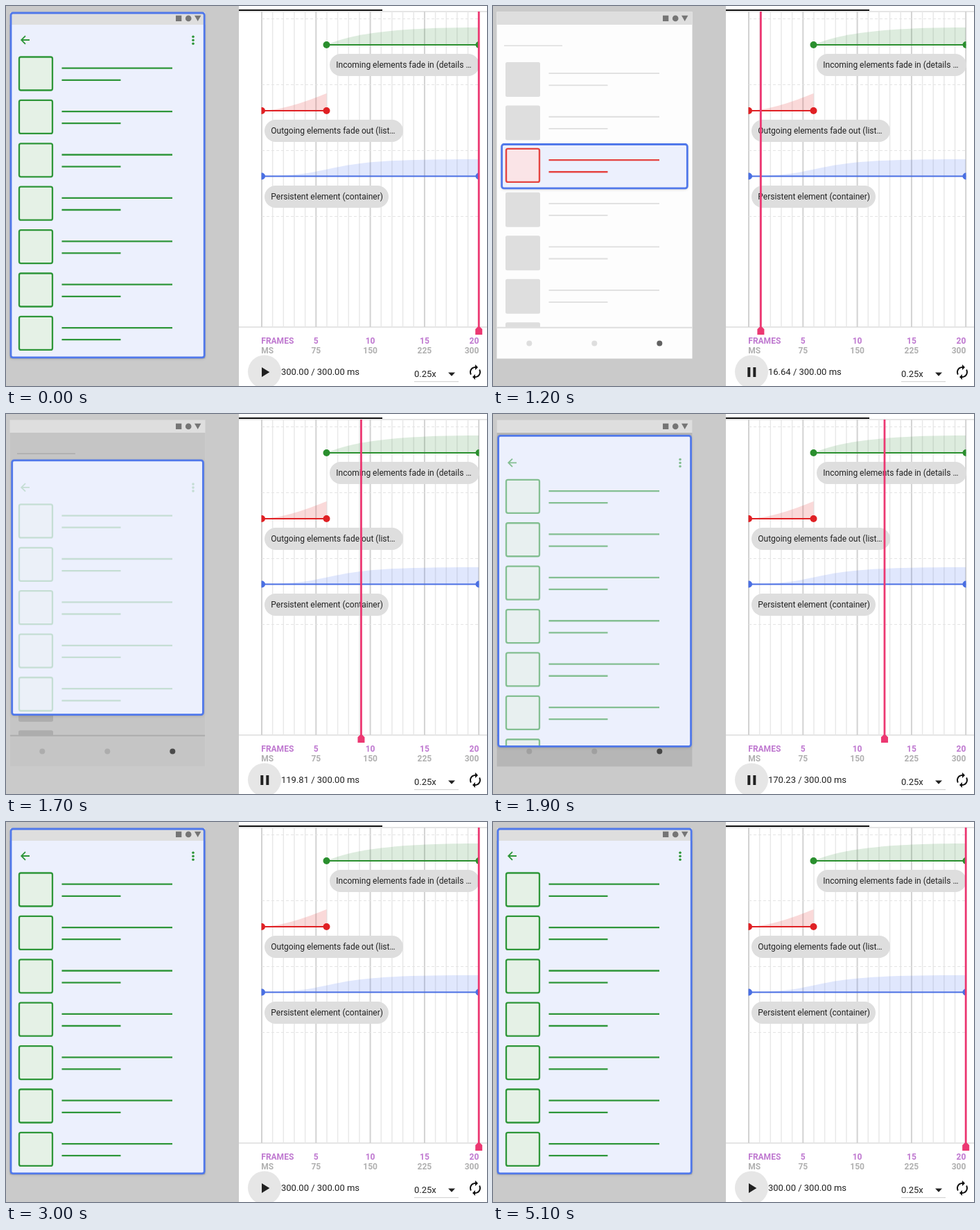
These frames come from a looping animation (694 px wide and 548 px high, 5.2 s). An HTML page:

```html
<!DOCTYPE html>
<html lang="en">
<head>
<meta charset="utf-8">
<title>Container transform timeline</title>
<style>
  html, body { margin: 0; width: 100%; height: 100%; overflow: hidden; background: #fff; }
  svg { display: block; }
  text { font-family: Roboto, sans-serif; fill: #212121; }
  .axis { font-size: 12px; font-weight: 700; }
  .chip { font-size: 12px; }
  .ui { font-size: 13px; }
</style>
</head>
<body>
<svg width="694" height="548" viewBox="0 0 694 548">
  <defs>
    <clipPath id="containerClip"><rect class="frame"/></clipPath>
    <clipPath id="listClip"><rect x="5" y="28" width="283" height="435"/></clipPath>
    <clipPath id="plotClip"><rect x="368.5" y="8" width="314" height="455"/></clipPath>
  </defs>

  <rect width="336" height="548" fill="#cacaca"/>
  <rect x="5.5" y="8.5" width="282" height="500" fill="#fdfdfd"/>
  <g clip-path="url(#listClip)">
    <path d="M16 57.3H100" stroke="#ddd" stroke-width="1.6"/>
    <g id="list" fill="#dedede" stroke="#dedede" stroke-width="1.8"/>
  </g>
  <path d="M5.5 463.7H287.5" stroke="#dedede" stroke-width="2"/>
  <g fill="#dedede">
    <circle cx="52.3" cy="486.5" r="4"/>
    <circle cx="146.3" cy="486.5" r="4"/>
    <circle cx="240.3" cy="486.5" r="4" fill="#616161"/>
  </g>
  <rect id="scrim" x="5.5" y="8.5" width="282" height="500"/>
  <rect class="frame" rx="3" fill="#ecf0fd" style="filter: drop-shadow(0 1px 2px #0004)"/>
  <g clip-path="url(#containerClip)">
    <g id="outgoing" fill="#fbe4e6" stroke="#e53935" stroke-width="2.4"/>
    <g id="incoming" fill="#e5f1e6" stroke="#2e9639" stroke-width="2.3">
      <path d="M34 49H22.5M28 43.2L22.2 49L28 54.8" fill="none" stroke-width="1.8"/>
      <g fill="#2e9639" stroke="none">
        <circle cx="270" cy="44.2" r="1.8"/><circle cx="270" cy="49.2" r="1.8"/><circle cx="270" cy="54.2" r="1.8"/>
      </g>
    </g>
  </g>
  <rect x="5.5" y="8.5" width="282" height="18.5" fill="#dedede"/>
  <g fill="#757575">
    <rect x="245" y="13.7" width="8.3" height="8.3"/>
    <circle cx="263.2" cy="17.9" r="4.3"/>
    <path d="M272 13.7h9.4l-4.7 8.3z"/>
  </g>
  <rect class="frame" rx="3" fill="none" stroke="#5078ea" stroke-width="2.8"/>

  <rect x="336" width="358" height="548" fill="#fff"/>
  <path d="M336 8H694M336 463H694" stroke="#ddd" stroke-width="1.5"/>
  <path d="M336 6H543" stroke="#111" stroke-width="2.2"/>
  <path id="minor" stroke="#e8e8e8" stroke-width="1.5"/>
  <path id="major" stroke="#d2d2d2" stroke-width="2"/>
  <path d="M369 18.5H682M369 113.5H682M369 208.5H682M369 303.5H682" stroke="#e4e4e4" stroke-dasharray="4 3"/>
  <g clip-path="url(#plotClip)" stroke-width="2.2">
    <path d="M462.5 56C490 44 540 31 682 31V56z" fill="#388e3c" opacity=".17"/>
    <path d="M369 151C400 150 435 137 462.5 126V151z" fill="#e53935" opacity=".19"/>
    <path d="M369 245.5C425 245.5 450 238 475 233C520 223 580 221 682 221V245.5z" fill="#4a6ff0" opacity=".17"/>
    <g id="tracks"></g>
  </g>
  <g id="chips"></g>
  <g id="axis"></g>
  <path id="marker" d="M-1.4 8H1.4V462.5L5 466V474H-5V466L-1.4 462.5z" fill="#ec3872"/>

  <circle cx="373" cy="527.5" r="24" fill="#e6e6e6"/>
  <path id="button" fill="#212121"/>
  <text id="clock" class="ui" x="397" y="532"></text>
  <text class="ui" x="589" y="534.7">0.25x</text>
  <path d="M589 541.7H653" stroke="#ccc"/>
  <path d="M638 528.5h10l-5 5.2z" fill="#212121"/>
  <path transform="translate(665 516)" fill="#111" d="M12 6v3l4-4-4-4v3c-4.42 0-8 3.58-8 8 0 1.57.46 3.03 1.24 4.26L6.7 14.8c-.45-.83-.7-1.79-.7-2.8 0-3.31 2.69-6 6-6zm6.76 1.74L17.3 9.2c.44.84.7 1.79.7 2.8 0 3.31-2.69 6-6 6v-3l-4 4 4 4v-3c4.42 0 8-3.58 8-8 0-1.57-.46-3.03-1.24-4.26z"/>
</svg>
<script>
const $ = id => document.getElementById(id);
const add = (id, markup) => $(id).insertAdjacentHTML('beforeend', markup);
const LOOP = 5200, STEP = 100, DURATION = 300;
const plotX = ms => 369 + ms / DURATION * 313.2;

// One list row: thumbnail plus two text lines
const row = (y, inset = 0) =>
  `<rect x="${18 + inset}" y="${y}" width="${50 - 2 * inset}" height="${50 - 2 * inset}" rx="2.5"
    ${inset ? '' : 'stroke="none"'}/><path d="M80.5 ${y + 16.2}H240M80.5 ${y + 33.3}H165.5"/>`;
for (let i = 0; i < 7; i++) {
  add('list', row(81 + i * 62.55));
  add('incoming', row(73.5 + i * 62.4, 1));
}
add('outgoing', row(206, 1));

let minor = '', major = '';
for (let i = 0; i <= 20; i++) {
  const line = `M${plotX(i * 15)} 8V463`;
  if (i % 5) minor += line; else major += line;
}
$('minor').setAttribute('d', minor);
$('major').setAttribute('d', major);

const track = (x1, x2, y, color) => add('tracks',
  `<g fill="${color}" stroke="${color}"><path d="M${x1} ${y}H${x2}"/>
   <g stroke="none"><circle cx="${x1}" cy="${y}" r="5"/><circle cx="${x2}" cy="${y}" r="5"/></g></g>`);
track(462.5, 682.5, 56, '#2a8f2e');
track(369, 462.5, 151, '#e02024');
track(369, 682.5, 245.5, '#4a6fe3');

const chip = (x, y, w, label) => add('chips',
  `<rect x="${x}" y="${y}" width="${w}" height="32" rx="16" fill="#dedede"/>
   <text class="chip" x="${x + 9.3}" y="${y + 20.3}">${label}</text>`);
chip(467, 69, 216, 'Incoming elements fade in (details …');
chip(373, 164, 200, 'Outgoing elements fade out (list…');
chip(373, 259, 179, 'Persistent element (container)');

const axisLabel = (x, anchor, top, bottom) => add('axis',
  `<g class="axis" text-anchor="${anchor}"><text x="${x}" y="486.5" style="fill:#bf78d0">${top}</text>
   <text x="${x}" y="500.5" style="fill:#b0b0b0">${bottom}</text></g>`);
axisLabel(368.3, 'start', 'FRAMES', 'MS');
for (const n of [5, 10, 15]) axisLabel(plotX(n * 15), 'middle', n, n * 15);
axisLabel(682.3, 'end', 20, 300);

const clamp = v => Math.min(1, Math.max(0, v));
const mix = (a, b, p) => a + (b - a) * p;

// cubic-bezier(x1, 0, x2, 1) or (x1, 0, x2, 1) with custom y2
function ease(x, x1, x2, y2 = 1) {
  let lo = 0, hi = 1, s = 0.5;
  for (let i = 0; i < 24; i++) {
    s = (lo + hi) / 2;
    const at = 3 * (1 - s) ** 2 * s * x1 + 3 * (1 - s) * s * s * x2 + s ** 3;
    if (at < x) lo = s; else hi = s;
  }
  return 3 * (1 - s) * s * s * y2 + s ** 3;
}

// [wall time, playhead, readout]; the readout trails the playhead
const KEYS = [[1200, 16.64, 16.64], [1500, 87.1, 69.4], [1900, 187.7, 170.23], [2200, 263.3, 245.43], [2300, 288.4, 270.5]];
function playback(time) {
  if (time < KEYS[0][0] || time > KEYS.at(-1)[0]) return [DURATION, DURATION];
  const i = Math.max(1, KEYS.findIndex(k => k[0] >= time));
  const a = KEYS[i - 1], b = KEYS[i], p = (time - a[0]) / (b[0] - a[0]);
  return [mix(a[1], b[1], p), mix(a[2], b[2], p)];
}

function draw(time) {
  const [ms, readout] = playback(time);
  const p = ease(clamp((ms === DURATION ? ms : ms - 3) / DURATION), 0.4, 0.2);
  const left = mix(12.7, 7, p), right = mix(280.3, 286.2, p);
  const top = mix(200.4, 10, p), bottom = mix(261.7, 506.8, p);
  for (const el of document.querySelectorAll('.frame')) {
    el.setAttribute('x', left);
    el.setAttribute('y', top);
    el.setAttribute('width', right - left);
    el.setAttribute('height', bottom - top);
  }
  $('scrim').setAttribute('opacity', 0.32 * p);
  $('outgoing').setAttribute('opacity', 1 - ease(clamp(ms / 86), 0.4, 1));
  $('outgoing').setAttribute('transform', `translate(0 ${top - 199.6})`);
  $('incoming').setAttribute('opacity', Math.sin(clamp((ms - 90) / 210) * Math.PI / 2) ** 1.5);
  $('incoming').setAttribute('transform', `translate(0 ${top - 10})`);
  $('marker').setAttribute('transform', `translate(${plotX(ms)} 0)`);
  $('button').setAttribute('d', ms < DURATION ? 'M367.3 521h4v14h-4zM375.3 521h4v14h-4z' : 'M369 521v14l11.3-7z');
  $('clock').textContent = `${readout.toFixed(2)} / 300.00 ms`;
}

function tick() {
  draw(Math.floor(performance.now() % LOOP / STEP) * STEP);
  requestAnimationFrame(tick);
}
tick();
</script>
</body>
</html>
```
